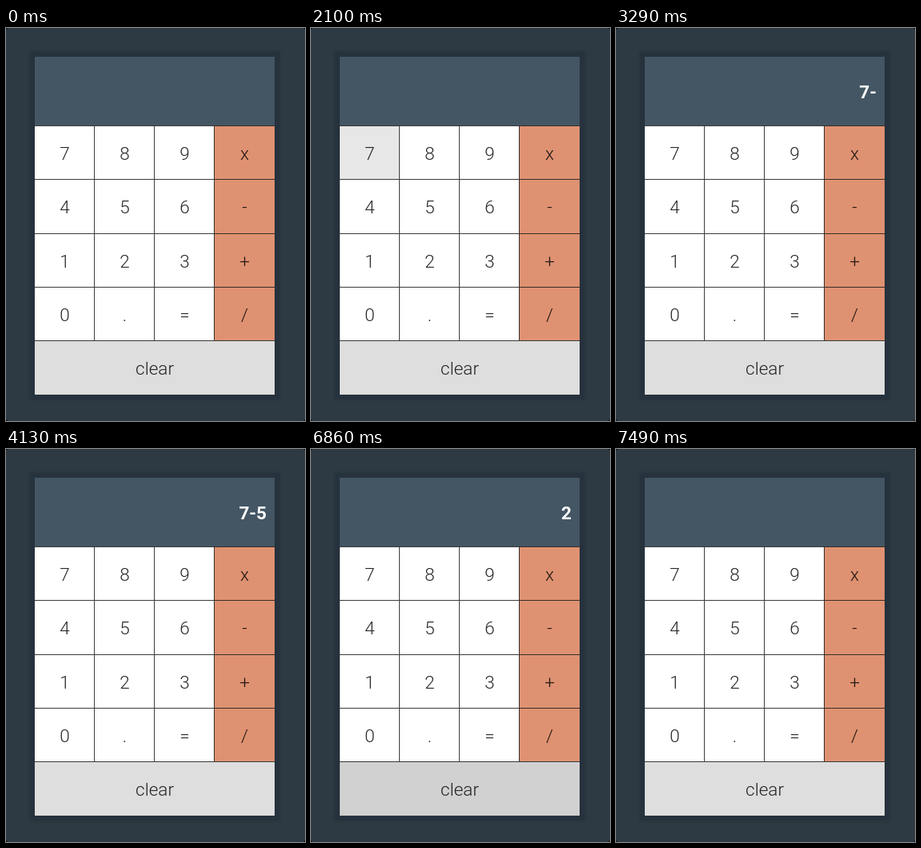
Recreate the animation shown at these times as an HTML page. Size 374 by 492 pixels, loop 8000 ms.

```html
<!DOCTYPE html>
<html lang="en">
<head>
<meta charset="utf-8">
<title>Calculator</title>
<style>
  html, body { margin: 0; width: 100%; height: 100%; overflow: hidden; background: #000; }
  svg { display: block; width: 374px; height: 492px; }
  text { font: 300 22.5px Roboto, sans-serif; fill: #000; fill-opacity: .84; text-anchor: middle; }
  #readout { font-weight: 700; fill: #fff; fill-opacity: 1; text-anchor: end; }
</style>
</head>
<body>
<svg id="stage" viewBox="0 0 374 492">
  <defs>
    <filter id="blur" x="-10%" y="-10%" width="120%" height="120%">
      <feGaussianBlur stdDeviation="1.2"/>
    </filter>
  </defs>
  <rect width="374" height="492" rx="3" fill="#2d3943"/>
  <rect x="29.5" y="29.5" width="313" height="436" fill="#25313d" filter="url(#blur)"/>
  <rect x="36" y="36" width="300" height="87" fill="#445664"/>
  <text id="readout" x="326" y="88"></text>
  <g id="keys"></g>
  <path id="rules" fill="none" stroke="#1c1c1e" stroke-opacity=".86" shape-rendering="crispEdges"/>
  <g id="labels"></g>
</svg>
<script>
const LOOP = 8000, STEP = 70;
const cols = [36, 110, 185, 260, 336];
const rows = [122, 189, 257, 324, 391, 459];
const baselines = [165, 232, 300, 367, 434];
const layout = ['789x', '456-', '123+', '0.=/'];

// Each press darkens its key from `down` to `up`; the readout changes on release.
const presses = [
  { key: '7', down: 1960, up: 2170, shows: '7' },
  { key: '-', down: 3220, up: 3290, shows: '7-' },
  { key: '5', down: 3990, up: 4130, shows: '7-5' },
  { key: '=', down: 5250, up: 5390, shows: '2' },
  { key: 'clear', down: 6860, up: 7070, shows: '' }
];

const $ = id => document.getElementById(id);
const shades = {};

function add(parent, tag, attrs, text = '') {
  const el = document.createElementNS('http://www.w3.org/2000/svg', tag);
  for (const name in attrs) el.setAttribute(name, attrs[name]);
  el.textContent = text;
  return parent.appendChild(el);
}

function addKey(label, x, right, row, center, fill) {
  const box = { x, y: rows[row], width: right - x, height: rows[row + 1] - rows[row] };
  add($('keys'), 'rect', { ...box, fill });
  shades[label] = add($('keys'), 'rect', { ...box, fill: '#000', opacity: 0 });
  add($('labels'), 'text', { x: center, y: baselines[row] }, label);
}

layout.forEach((line, row) => [...line].forEach((label, col) =>
  addKey(label, cols[col], cols[col + 1], row, 73.5 + 75 * col, col === 3 ? '#df9272' : '#fff')));
addKey('clear', 36, 336, 4, 186, '#dedede');

$('rules').setAttribute('d',
  rows.slice(0, 5).map(y => `M36 ${y + .5}H336`).join('') +
  cols.slice(1, 4).map(x => `M${x + .5} 122V391`).join(''));

function shadeAt({ down, up }, t) {
  if (t < down || t >= up) return 0;
  return t < down + STEP ? 0.06 : 0.094;
}

function draw(t) {
  let value = '';
  for (const press of presses) {
    shades[press.key].setAttribute('opacity', shadeAt(press, t));
    if (t >= press.up) value = press.shows;
  }
  if ($('readout').textContent !== value) $('readout').textContent = value;
}

function frame() {
  draw(performance.now() % LOOP);
  requestAnimationFrame(frame);
}
frame();
</script>
</body>
</html>
```
